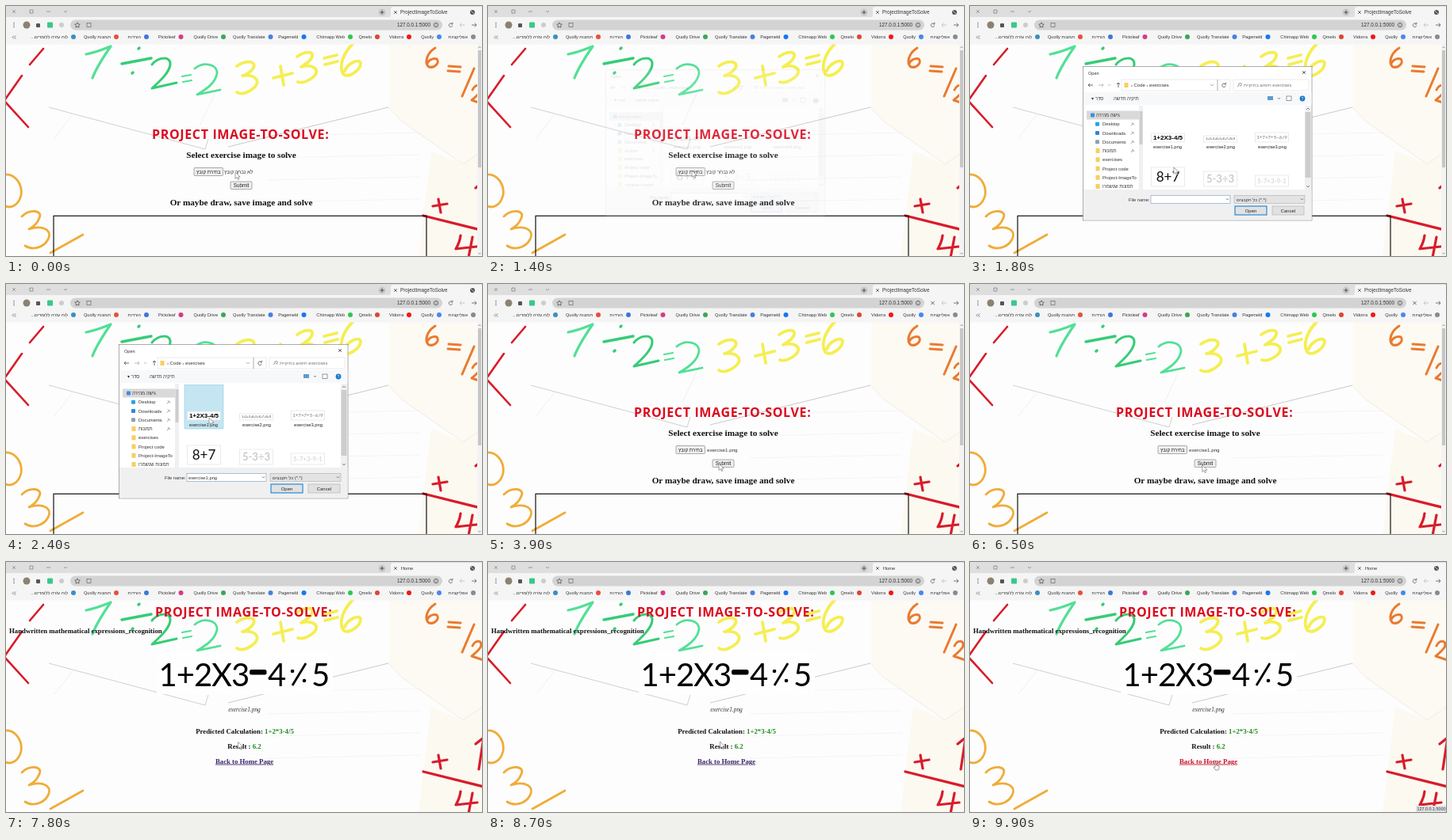
Animation, 600 px wide and 316 px high, one loop 10000 ms. Source, as an HTML page:

```html
<!DOCTYPE html>
<html lang="en">
<head>
<meta charset="utf-8">
<title>ProjectImageToSolve</title>
<style>
html, body { margin: 0; width: 100%; height: 100%; overflow: hidden; background: #fff; }
svg { display: block; width: 100vw; height: 100vh; font-family: "Liberation Sans", Arial, sans-serif; }
.serif { font-family: "Liberation Serif", Times, serif; font-weight: bold; fill: #111; }
.title { font: bold 16px "Comic Sans MS", "Open Sans", sans-serif; letter-spacing: .65px; fill: #dc0a1e; }
.big { font: 40px Lato, sans-serif; letter-spacing: -1px; fill: #000; }
.ink path { fill: none; stroke-linecap: round; stroke-linejoin: round; }
</style>
</head>
<body>
<svg id="stage" viewBox="0 0 600 316"></svg>
<script>
const text = (x, y, str, size = 5.7, more = 'fill="#333"') =>
  `<text x="${x}" y="${y}" font-size="${size}" ${more}>${str}</text>`;
const mid = (x, y, str, size, more = 'fill="#222"') => text(x, y, str, size, `text-anchor="middle" ${more}`);
const rect = (x, y, w, h, fill, more = '') =>
  `<rect x="${x}" y="${y}" width="${w}" height="${h}" fill="${fill}" ${more}/>`;
const dot = (x, y, r, fill) => `<circle cx="${x}" cy="${y}" r="${r}" fill="${fill}"/>`;
const line = (d, color = '#555', width = .8) =>
  `<path d="${d}" fill="none" stroke="${color}" stroke-width="${width}"/>`;
const group = (id, body) => `<g id="${id}">${body}</g>`;
const edge = color => `stroke="${color}" stroke-width=".6"`;
const button = (x, y, w, h, label, size = 6.2) =>
  rect(x, y, w, h, '#efefef', `rx="1" ${edge('#777')}`) + mid(x + w / 2, y + h / 2 + 2.2, label, size);
const folder = (x, y) => rect(x - 2.5, y - 3, 5, 6, '#f8cf5c', 'rx=".6"');
const cross = (x, y, r = 1.8) => `M${x - r} ${y - r}l${2 * r} ${2 * r}m0 ${-2 * r}l${-2 * r} ${2 * r}`;
const reload = (x, y) => line(`M${x + 1.8} ${y - 1.3}a2.3 2.3 0 1 0 .5 2m.1 -4v2.2h-2.2`);

function paper() {
  const red = '#d81c2a', orange = '#f0ac38', rust = '#ea7a30', yellow = '#f5ee52',
        lime = '#52e096', green = '#36cc76';
  const rules = [164, 192, 220, 248].map(y => line(`M330 ${y}L522 ${y - 4}`, '#f1f1f5')).join('');
  return rect(0, 48, 600, 268, '#fdfdfd') +
    '<path d="M483 48H602V182L576 200L499 146L483 128Z" fill="#fcfaf2"/>' +
    '<path d="M536 183L576 200L602 182V318H520Z" fill="#fcf9f1"/>' + rules +
    line('M54 128L251 181L255 168', '#c4c4c4') + line('M85 136L61 167M268 100L245 150', '#ececec') +
    line('M280 178L482 128', '#bcbcbc') + line('M482 128L499 146L576 200L602 182', '#ece8df') +
    '<g class="ink">' +
    line('M47 54L30 74M20 88L-1 118M-2 120L28 153', red, 2.6) +
    line('M101 61C113 59 122 55 132 51C123 64 114 78 109 91', lime, 3.2) +
    line('M146 73L183 66M167 54l1 -1M159 85l1 -1', green, 3.5) +
    line('M184 74C192 64 208 63 207 74C206 84 194 95 184 104L215 97', green, 3) +
    line('M222 89l11 -2M223 96l11 -2', lime, 2.2) +
    line('M238 79C249 70 266 73 266 85C264 98 251 106 241 112L270 106', lime, 2.8) +
    line('M291 76C302 68 316 69 312 78C308 84 302 87 298 88C311 86 322 93 314 102C307 109 297 113 291 109', yellow, 3.8) +
    line('M337 91L361 85M346 76L350 100', yellow, 3.8) +
    line('M367 64C378 56 390 57 385 66C381 73 375 74 372 77C386 73 397 80 388 89C382 95 373 98 368 96', yellow, 3.8) +
    line('M401 66l16 -4M402 74l16 -4M439 46C425 59 419 76 425 86C432 92 447 81 447 72C445 66 431 72 427 82', yellow, 3.8) +
    line('M541 53C530 60 527 72 533 77C541 79 547 71 543 67C538 65 532 69 531 73', rust, 3) +
    line('M558 76l15 1M557 82l15 1M590 79L575 114M588 106C592 97 602 99 598 108C594 114 590 116 587 119L602 124', rust, 3) +
    line('M-3 213C12 211 21 226 19 239C16 252 6 257 -3 252', orange, 2.8) +
    line('M20 266C30 256 47 258 42 268C39 276 33 280 29 282C47 276 59 284 53 295C47 306 33 309 24 303M56 312L97 289', orange, 2.8) +
    line('M538 253L556 250M545 244L548 261M526 265L602 284M573 290C572 298 570 302 567 307L594 304M588 292L583 318M592 230L602 222L596 262', red, 3.2) +
    '</g>';
}

function chrome() {
  // label, icon position and colour
  const bookmarks = [
    ['...לוח עזרה ללומדים', 85, '#3b8fc4'], ['Quolly תמונות', 139, '#e8503a'],
    ['הורדות', 177, '#3b78d8'], ['Pictoleaf', 220.5, '#d63a86'],
    ['Quolly Drive', 274, '#3aa757'], ['Quolly Translate', 333.5, '#4a7fe0'],
    ['Pagemeld', 375.5, '#1877f2'], ['Chirnapp Web', 434, '#2fc653'],
    ['Qmelo', 468, '#e04438'], ['Vidorra', 508, '#f01818'],
    ['Quolly', 546, '#4a86ee'], ['אפליקציות', 589, '#8a8a8a']];
  return rect(0, 0, 600, 15, '#dedede') + rect(0, 14, 600, 34.5, '#f5f5f5') +
    '<path d="M482 15Q485 14 485 11V4Q485 1 488 1H600V15Z" fill="#f5f5f5"/>' +
    line(cross(10, 7) + 'M30 5h4v4h-4zM51 7h5M73 6l2 2 2 -2', '#777', .7) +
    dot(474, 8, 4.5, '#cacaca') + line('M471.5 8h5m-2.5 -2.5v5', '#333') + line(cross(491, 8), '#444') +
    group('globe', dot(588, 8, 3, '#555') + line('M586 6l4 4', '#ddd')) +
    rect(81, 17.5, 469, 13, '#d3d3d3', 'rx="6.5"') +
    [21.5, 24, 26.5].map(y => dot(10, y, .7, '#555')).join('') +
    dot(26, 24, 4.5, '#8d8170') + rect(38, 22, 5, 5, '#555', 'rx="1"') +
    rect(52, 20.5, 7, 7, '#39c88b', 'rx="1"') + dot(70, 24, 3, '#ccc') +
    line('M90 20.8l1 2.1 2.3 .3 -1.7 1.6 .4 2.3 -2 -1.1 -2 1.1 .4 -2.3 -1.7 -1.6 2.3 -.3z', '#444', .7) +
    rect(102, 21.5, 5, 5, 'none', edge('#555')) +
    text(493, 26.3, '127.0.0.1:5000', 6.3) +
    '<circle cx="542" cy="24" r="2.7" fill="none" stroke="#444" stroke-width=".7"/>' +
    line('M542 23.7v1.6M542 22.4v.6', '#444', .7) +
    line('M578 24h-6m2.4 -2.4l-2.4 2.4 2.4 2.4', '#bbb') +
    line('M587 24h6m-2.4 -2.4l2.4 2.4 -2.4 2.4', '#555') +
    line('M10 37.5l-2 2 2 2m2.5 -4l-2 2 2 2', '#555', .7) +
    bookmarks.map(([name, x, color]) =>
      text(x - 7, 41.2, name, 5.6, 'text-anchor="end" fill="#333"') + dot(x, 39, 3, color)).join('') +
    group('reload', reload(560.5, 24)) + group('stop', line(cross(560.5, 24, 2.2), '#444')) +
    group('tabHome', text(497, 10.2, 'ProjectImageToSolve', 6.3)) + group('tabResult', text(498, 10.2, 'Home', 5.7));
}

const homePage = () =>
  rect(594, 48, 6, 268, '#f3f3f3') + rect(595, 56, 4, 148, '#c6c6c6') +
  line('M595.5 53l1.5 -1.5 1.5 1.5M595.5 312l1.5 1.5 1.5 -1.5', '#666', .7) +
  '<text class="title" x="184" y="168.3">PROJECT IMAGE-TO-SOLVE:</text>' +
  mid(296.5, 192, 'Select exercise image to solve', 11.2, 'class="serif"') +
  button(237, 204.5, 36.5, 10, 'בחירת קובץ') +
  group('noFile', text(275, 211.6, 'לא נבחר קובץ', 6.2)) +
  group('hasFile', text(276, 211.6, 'exercise1.png', 6.2)) +
  button(283, 222, 27, 9.5, 'Submit', 6.3) +
  mid(296.5, 251.6, 'Or maybe draw, save image and solve', 11.2, 'class="serif"') +
  rect(60, 265.3, 470, 60, 'none', 'stroke="#111" stroke-width="1.2"');

const resultPage = () =>
  rect(190, 113, 222, 54, '#fefefe') +
  '<text class="title" x="188" y="68.8">PROJECT IMAGE-TO-SOLVE:</text>' +
  text(4, 89.6, 'Handwritten mathematical expressions_recognition', 8.75, 'class="serif"') +
  '<text class="big" x="192.5" y="156.5">1+2X3</text><text class="big" x="330" y="156.5">4</text>' +
  '<text class="big" x="385" y="156.5">5</text>' + rect(307, 136, 21.5, 6.5, '#000', 'rx="2.5"') +
  line('M378 128L361 156', '#000', 2.8) + dot(361, 138, 2.3, '#000') + dot(376, 150, 2.3, '#000') +
  mid(300.5, 188.5, 'exercise1.png', 7.4, 'style="font-family:\'Liberation Serif\',serif;font-style:italic" fill="#333"') +
  mid(301, 217, 'Predicted Calculation: <tspan fill="#1e8a1e">1+2*3-4/5</tspan>', 8.8, 'class="serif"') +
  mid(300.5, 236, 'Result : <tspan fill="#1e8a1e">6.2</tspan>', 8.8, 'class="serif"') +
  group('link', mid(300.5, 254.6, 'Back to Home Page', 8.75,
    'class="serif" style="fill:currentColor;text-decoration:underline"')) +
  group('status', rect(562, 308, 38, 8, '#dfe0e4') + text(563.5, 314.2, '127.0.0.1:5000', 5.4));

function dialog() {
  const places = ['גישה מהירה', 'Desktop', 'Downloads', 'Documents', 'תמונות', 'exercises',
    'Project code', 'Project-ImageTo', 'תמונות שנשמרו'];
  const sidebar = places.map((name, i) => {
    const y = 138 + i * 11.25, blue = i < 4;
    return (blue ? rect(i ? 158 : 152, y - 2.5, 5, 5, ['#3b8ede', '#2aa0e8', '#2f86d8', '#8aa0b4'][i], 'rx="1"') : folder(161, y)) +
      text(i ? 167 : 159, y + 2.2, name, 5.9) +
      (i > 0 && i < 5 ? line(`M203 ${y + 2}l3 -3m-2 -1l3 3`, '#777') : '');
  }).join('');
  const thumb = (x, y, h, label, size, color, more = '') =>
    rect(x, y, 42, h, '#fff', edge('#ddd')) + mid(x + 21, y + h / 2 + size * .36, label, size, `fill="${color}" ${more}`);
  const hand = 'style="font-family:Lato,sans-serif"';
  const files = group('selected', rect(225, 127.5, 49, 55.5, '#c4e5f2', edge('#90cdea'))) +
    thumb(228.5, 161, 11, '1+2X3-4/5', 8, '#000', 'font-weight="bold"') +
    thumb(294.5, 164, 8, '1+2+3+4+5+6+7+8+9', 3.8, '#333') +
    thumb(359.5, 160, 12, '1+7×7+5−6/9', 6.2, '#777', hand) +
    thumb(228.5, 204, 24, '8+7', 17, '#111', hand) +
    thumb(294.5, 209, 19, '5-3÷3', 13, '#bbb', hand) +
    thumb(359.5, 214, 14, '5-7+3-9-1', 8, '#ccc', hand) +
    [249, 316, 381].map((x, i) => mid(x, 180, `exercise${i + 1}.png`, 5.8)).join('');
  return rect(142.5, 76.5, 288.5, 194.5, '#fff', edge('#777')) +
    text(149, 87, 'Open', 5.6) + line(cross(421, 84), '#333') +
    line('M155 100h-6m2 -2l-2 2 2 2M187 103v-6m-2 2l2 -2 2 2', '#444') +
    line('M162 100h6m-2 -2l2 2 -2 2M174 99l1.5 1.5 1.5 -1.5', '#aaa') +
    rect(191, 93, 137, 14, '#fff', edge('#ddd')) + folder(197, 100) +
    text(203, 102.2, '› Code › exercises', 5.9) + line('M303 99l2 2 2 -2M312 93v14', '#777', .6) + reload(320, 100) +
    rect(332, 93, 95, 14, '#fff', edge('#ddd')) + line('M337 102l2 -2a1.7 1.7 0 1 1 .8 .8', '#777') +
    text(345, 102.2, 'חיפוש בתיקיית exercises', 5.7, 'fill="#777"') +
    rect(143, 109, 287.5, 16, '#f7f8fa') + text(153, 119, '▾ סדר', 6) + text(181, 119, 'תיקיה חדשה', 6) +
    rect(375, 114, 7, 5, '#5e9bd0') + line('M388 116l1.5 1.5 1.5 -1.5') +
    rect(399, 114, 6, 5.5, '#fff', edge('#555')) + dot(419, 117, 3.4, '#1479cf') + mid(419, 119, '?', 5.2, 'fill="#fff"') +
    rect(147, 132.5, 66, 11, '#d9d9d9') + sidebar +
    rect(213, 126, 5, 107, '#f0f0f0') + rect(213.5, 133, 4, 42, '#cdcdcd') + files +
    rect(422, 126, 8, 107, '#f0f0f0') + rect(422.5, 134, 7, 83, '#cdcdcd') +
    line('M424 131l2 -2 2 2M424 227l2 2 2 -2', '#666') +
    rect(143, 232, 287.5, 38.5, '#f0f0f0') + text(200, 246.8, 'File name:', 5.7) +
    rect(228, 239.5, 100, 10, '#fff', edge('#7a9cc0')) + line('M323 243.5l1.5 1.5 1.5 -1.5') +
    group('fileName', text(230, 246.6, 'exercise1.png', 5.8)) +
    rect(333, 239.5, 89, 10, '#e3e3e3', edge('#adadad')) + text(336, 246.6, 'כל הקבצים (*.*)', 5.7) +
    line('M417 243.5l1.5 1.5 1.5 -1.5') +
    rect(334, 253, 40, 11, '#e1e1e1', 'stroke="#0078d7"') + mid(354, 260.7, 'Open', 5.9) +
    rect(381, 253, 40, 11, '#e1e1e1', edge('#adadad')) + mid(401, 260.7, 'Cancel', 5.9);
}

const arrow = '<path d="M0 0V8.4L2 6.6L3.4 9.6L4.8 9L3.5 6.1H6.1Z" fill="#fff" stroke="#666" stroke-width=".6"/>';
const pointer = '<path d="M0 0Q1.2 -.8 1.4 .6V3L5 4V6.5L4 9H.6L-2 5.4Q-1.6 4.4 0 5.4Z" fill="#fff" stroke="#555" stroke-width=".6"/>';

stage.innerHTML = group('paper', paper()) + group('home', homePage()) + group('result', resultPage()) + chrome() +
  group('dialog', dialog()) + group('cursor', group('arrow', arrow) + group('pointer', pointer));

const el = id => document.getElementById(id);
const show = (on, ...ids) => ids.forEach(id => el(id).setAttribute('visibility', on ? 'inherit' : 'hidden'));
const clamp = v => Math.max(0, Math.min(1, v));
const ease = v => v * v * (3 - 2 * v);

// time, x, y of the mouse
const route = [[0, 289, 210], [500, 289, 210], [1100, 257, 208], [1700, 257, 208], [2200, 256, 169],
  [2600, 256, 169], [3150, 352, 256], [3350, 352, 256], [3800, 291, 227], [4300, 291, 227], [5000, 293, 230],
  [8900, 292.5, 227], [9500, 309, 254], [10000, 309, 254]];

function mouse(t) {
  const i = route.findIndex(p => p[0] > t);
  const [t0, x0, y0] = route[i - 1], [t1, x1, y1] = route[i];
  const k = ease((t - t0) / (t1 - t0));
  return [x0 + (x1 - x0) * k, y0 + (y1 - y0) * k];
}

function draw(now) {
  const t = now % 10000;
  const solved = t >= 7200, picked = t >= 2300, chosen = t >= 3350, loading = t >= 3850 && !solved;
  const overLink = t >= 9300;
  show(!solved, 'home', 'tabHome');
  show(solved, 'result', 'tabResult');
  show(!loading, 'reload', 'globe');
  show(loading, 'stop');
  show(!chosen, 'noFile');
  show(chosen && !solved, 'hasFile');
  show(picked, 'selected', 'fileName');
  show(overLink, 'status', 'pointer');
  show(!overLink, 'arrow');
  el('link').style.color = t >= 9800 ? '#c8122c' : '#3c2468';

  const open = clamp((t - 1380) / 170) * (1 - clamp((t - 3300) / 120));
  const size = .955 + .045 * ease(open);
  el('dialog').setAttribute('opacity', open);
  el('dialog').setAttribute('transform', `translate(286.7 173.7) scale(${size}) translate(-286.7 -173.7)`);
  el('cursor').setAttribute('transform', `translate(${mouse(t)})`);
}

// nested "inherit" keeps parts of a hidden page hidden
const start = performance.now();
(function tick() {
  draw(performance.now() - start);
  requestAnimationFrame(tick);
})();
</script>
</body>
</html>
```
